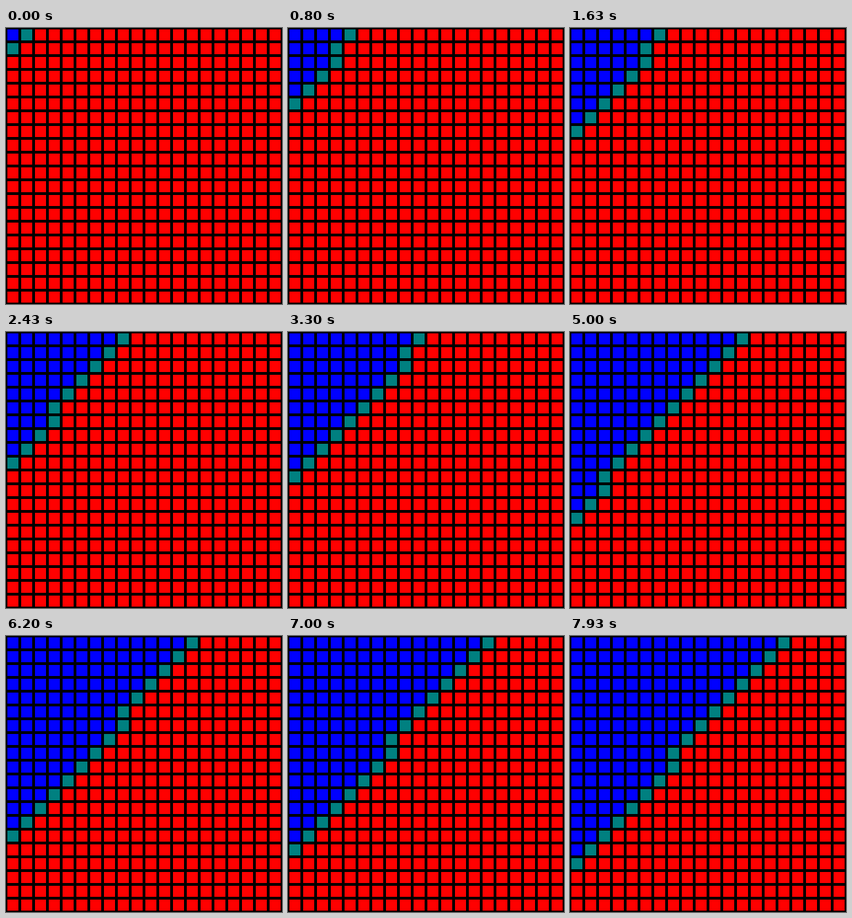
Write an HTML page with a canvas that moves like this. It is 400 px wide and 400 px high and loops after 8 s.

```html
<!DOCTYPE html>
<html lang="en">
<head>
<meta charset="utf-8">
<title>Breadth-first search</title>
<style>
  html, body { margin: 0; width: 100%; height: 100%; overflow: hidden; background: #000; }
  canvas { display: block; }
</style>
</head>
<body>
<canvas id="stage" width="400" height="400"></canvas>
<script>
const ctx = document.getElementById('stage').getContext('2d');
const SIZE = 20, CELL = 20, GAP = 4;
const LOOP = 8000, TICKS_PER_MS = 0.03, TICKS_PER_STEP = 1.875;
const COLORS = { unseen: '#f00', queued: '#008080', visited: '#00f' };
const DIRECTIONS = [[0, -1], [0, 1], [-1, 0], [1, 0]];

// Steps fall on whole ticks of a 30 Hz clock.
function stepAt(time) {
  const tick = Math.floor((time + 4) * TICKS_PER_MS);
  let step = 0;
  while (Math.round((step + 1) * TICKS_PER_STEP) <= tick) step++;
  return step;
}

// The start has no parent, so the search queues it a second time.
function search(visits) {
  const state = new Array(SIZE * SIZE).fill('unseen');
  const parent = new Map();
  const queue = [0];
  for (let i = 0; i < visits; i++) {
    const cell = queue[i];
    state[cell] = 'visited';
    for (const [dx, dy] of DIRECTIONS) {
      const x = cell % SIZE + dx, y = Math.floor(cell / SIZE) + dy;
      if (x < 0 || y < 0 || x >= SIZE || y >= SIZE) continue;
      const next = y * SIZE + x;
      if (parent.has(next)) continue;
      parent.set(next, cell);
      state[next] = 'queued';
      queue.push(next);
    }
  }
  return state;
}

function draw(time) {
  ctx.fillStyle = '#000';
  ctx.fillRect(0, 0, 400, 400);
  search(stepAt(time) + 1).forEach((status, i) => {
    const x = i % SIZE, y = Math.floor(i / SIZE);
    ctx.fillStyle = COLORS[status];
    ctx.fillRect(x * CELL + GAP / 2, y * CELL + GAP / 2, CELL - GAP, CELL - GAP);
  });
}

const start = performance.now();
function frame() {
  draw((performance.now() - start) % LOOP);
  requestAnimationFrame(frame);
}
frame();
</script>
</body>
</html>
```
